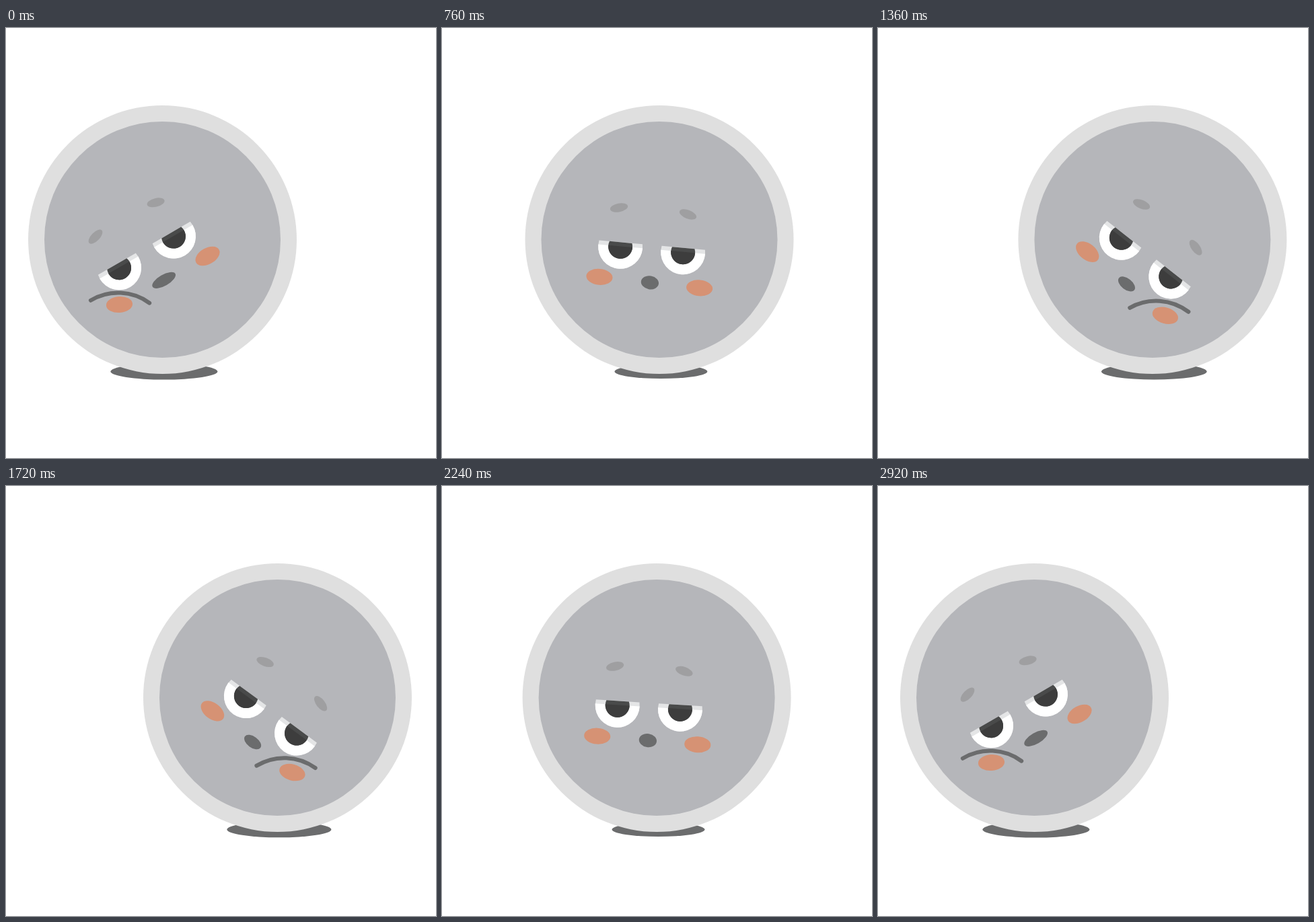
An HTML page with a canvas for the animation above (2960 ms loop, 639 by 639 pixels).

```html
<!DOCTYPE html>
<html lang="en">
<head>
<meta charset="utf-8">
<title>Rolling grumpy ball</title>
<style>
html, body { margin: 0; width: 100%; height: 100%; overflow: hidden; background: #fff; }
canvas { display: block; width: 639px; height: 639px; }
</style>
</head>
<body>
<canvas id="stage" width="639" height="639"></canvas>
<script>
const ctx = document.getElementById('stage').getContext('2d');
const SIZE = 639, LOOP = 2960, STEP = 40;
const TURN = 1520, BACK = 1400;
const RAD = Math.PI / 180;
const DARK = '#6b6c6d', BROW = '#9f9fa1', CHEEK = '#d69274';

const clamp = v => Math.min(1, Math.max(0, v));
const ease = p => p * p * (3 - 2 * p);

// 0 = far left, 1 = far right
function rollAt(t) {
  return t < TURN ? ease(t / TURN) : 1 - ease(clamp((t - TURN) / BACK));
}

function ellipse(x, y, rx, ry, deg, color) {
  ctx.fillStyle = color;
  ctx.beginPath();
  ctx.ellipse(x, y, rx, ry, deg * RAD, 0, Math.PI * 2);
  ctx.fill();
}

// Disc cut off flat at height "top" above its centre
function cutDisc(r, top, color) {
  const a = Math.asin(top / r);
  ctx.fillStyle = color;
  ctx.beginPath();
  ctx.arc(0, 0, r, -a, Math.PI + a);
  ctx.closePath();
  ctx.fill();
}

function eye(x) {
  const lid = 6.5, edge = 0.5;
  ctx.save();
  ctx.translate(x, 0);
  cutDisc(33, lid, '#e4e5e6');
  cutDisc(33, edge, '#fff');
  cutDisc(18, lid, '#494a4a');
  cutDisc(18, edge, '#3d3d3d');
  ctx.restore();
}

function mouth(x, y, deg, alpha) {
  if (alpha <= 0) return;
  ctx.save();
  ctx.globalAlpha = alpha;
  ctx.translate(x, y);
  ctx.rotate(deg * RAD);
  ctx.strokeStyle = DARK;
  ctx.lineWidth = 6;
  ctx.lineCap = 'round';
  ctx.beginPath();
  ctx.moveTo(-43.7, 0);
  ctx.bezierCurveTo(-17, -17.5, 17, -17.5, 43.7, 0);
  ctx.stroke();
  ctx.restore();
}

function nose(u) {
  const stretch = 6.3 * (1 - Math.pow(clamp(u / 0.25), 1.5)) + 1.6 * clamp((u - 0.8) / 0.2);
  const mid = Math.sin(Math.PI * u) ** 2;
  ellipse(1.7, 49.3, 13.2 + stretch, 8.2 + 1.8 * mid, 5 * mid, DARK);
}

function face(u) {
  eye(-46.7);
  eye(46.7);
  ellipse(-54, -57.5, 13.3, 6.4, -16, BROW);
  ellipse(49, -56.7, 13.3, 6.4, 16, BROW);
  ellipse(-73.7, 47.6, 19.6, 12, 26 * clamp(1 - 2.6 * u), CHEEK);
  ellipse(75.8, 50.7, 19.6, 12, -24 * clamp(2.5 * u - 1.5), CHEEK);
  nose(u);
  mouth(-70.6, 44.4, 32.6, clamp((0.23 - u) / 0.08));
  mouth(63.4, 49.6, -34.2, clamp((u - 0.737) / 0.08));
}

function draw(t) {
  const u = rollAt(t);
  const x = 232.5 + 181 * u, y = 314.5;
  const shade = 68.9 + 10.6 * Math.pow(Math.abs(2 * u - 1), 1.8);

  ctx.fillStyle = '#fff';
  ctx.fillRect(0, 0, SIZE, SIZE);
  ellipse(x + 2.4, 510.5, shade, shade * 0.152, 0, DARK);
  ellipse(x, y, 199.5, 199.5, 0, '#dfdfdf');
  ellipse(x, y, 175.5, 175.5, 0, '#b5b6ba');

  ctx.save();
  ctx.translate(x, y);
  ctx.rotate((-30 + 70.3 * u) * RAD);
  ctx.translate(-30 + 40 * u, 4 + 23 * u);
  face(u);
  ctx.restore();
}

let start = null;
function tick(now) {
  if (start === null) start = now;
  const t = (now - start) % LOOP;
  draw(Math.floor(t / STEP) * STEP);
  requestAnimationFrame(tick);
}
draw(0);
requestAnimationFrame(tick);
</script>
</body>
</html>
```
